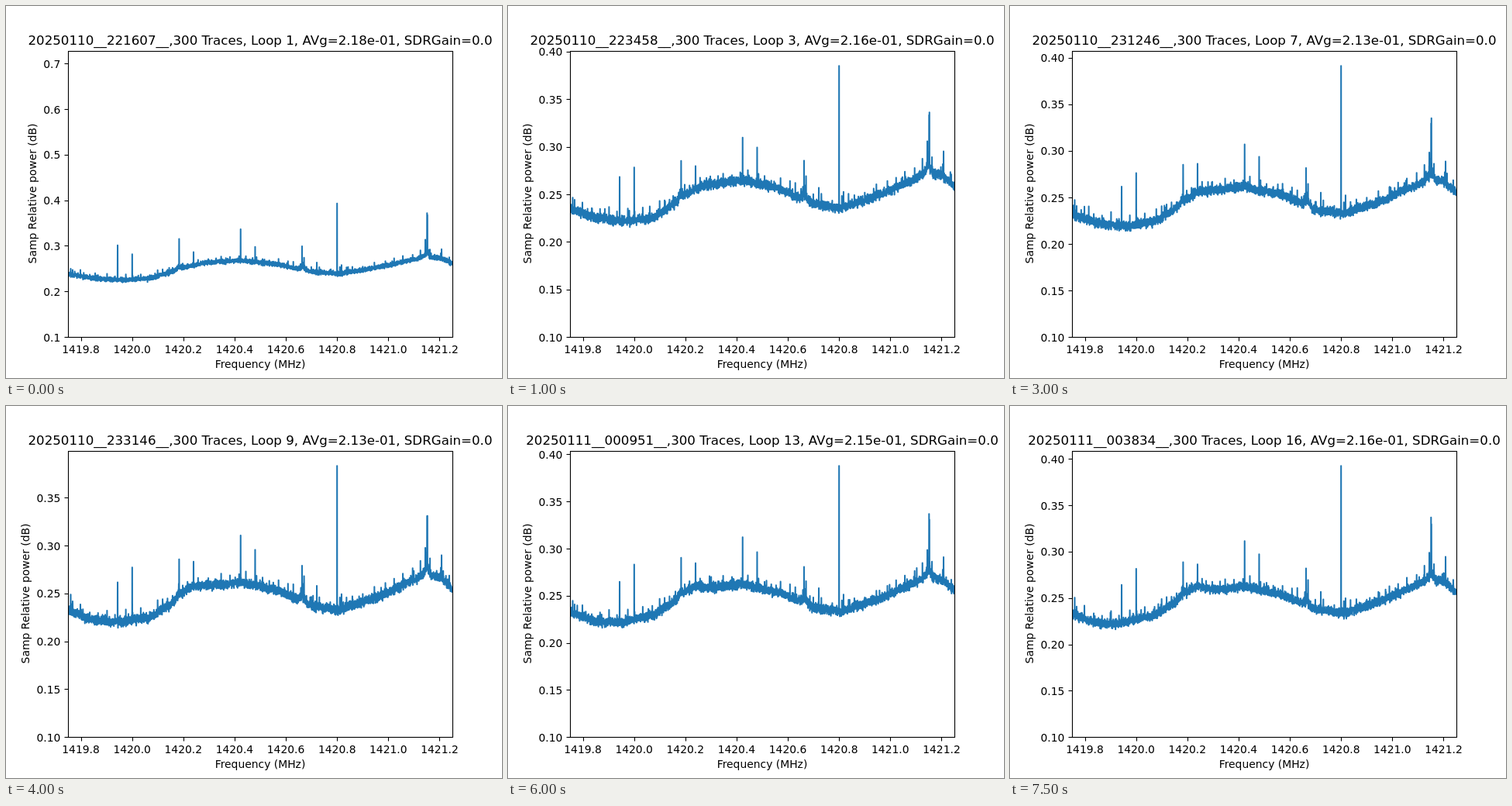
An HTML page that plays this animation: 640x480 px, repeating every 8000 ms.

```html
<!DOCTYPE html>
<html lang="en">
<head>
<meta charset="utf-8">
<title>Spectrum loops</title>
<style>
  html, body { margin: 0; width: 100%; height: 100%; overflow: hidden; background: #fff; }
  svg { display: block; width: 640px; height: 480px; }
  text { font: 13.889px "DejaVu Sans", sans-serif; fill: #000; text-anchor: middle; }
  #title { font-size: 16.667px; }
  #yTicks text { text-anchor: end; }
  .axis { fill: none; stroke: #000; stroke-width: 1.11; }
  #trace { fill: none; stroke: #1f77b4; stroke-width: 2.083; stroke-linejoin: round; }
</style>
</head>
<body>
<svg viewBox="0 0 640 480">
  <clipPath id="plot"><rect x="80" y="57.6" width="496" height="369.6"/></clipPath>
  <g clip-path="url(#plot)"><path id="trace"/></g>
  <g id="xTicks"></g>
  <g id="yTicks"></g>
  <rect class="axis" x="80.5" y="58.5" width="496" height="369"/>
  <text id="title" x="328" y="50"></text>
  <text x="328" y="467">Frequency (MHz)</text>
  <text id="yLabel">Samp Relative power (dB)</text>
</svg>
<script>
const LEFT = 80, RIGHT = 576, BOTTOM = 427.2, HEIGHT = 369.6, FLOOR = 0.1;
const LOOPS = 16, HOLD = 500, SAMPLES = 4400, STEP = (RIGHT - LEFT) / SAMPLES;
const PEAK_X = 427.2, PEAK_Y = 77.3;
const $ = id => document.getElementById(id);

// Key loops: clock in seconds of the first day, mean level, pixels per unit
const keyLoops = [1, 3, 5, 7, 9, 13, 16];
const clock = [80167, 81298, 82431, 83566, 84706, 86991, 88714];
const average = [2.18, 2.16, 2.13, 2.13, 2.13, 2.15, 2.16];
const scale = [588.6, 1228, 1212, 1202, 1236, 1216, 1197];

// Levels and heights are in 1e-4 of the axis unit
const bandX = [80, 110, 150, 185, 215, 240, 302, 350, 392, 430, 480, 538, 560, 576];
const band = [2320, 2226, 2182, 2215, 2365, 2545, 2615, 2528, 2371, 2322, 2462, 2680, 2668, 2550];

// Strong spikes: x, height above the band, growth in the first loop
const spikes = [
  [83.5, 150, 1], [144, 445, 1.75], [162.8, 570, 1], [223.4, 400, 1.6], [242, 270, 1],
  [302.7, 480, 1.4], [321.5, 350, 1], [382, 380, 1.3], [384.6, 260, 1], [401, 190, 1],
  [433, 170, 1], [541, 320, 1.2], [543.3, 650, 1.5], [543.8, 640, 1.5], [562, 265, 0.8]
];
// Ragged skirts around the widest signals: x, height
const skirts = [[223, 100], [383, 150], [543, 220]];

const bell = (x, mid, width, power = 2) => Math.exp(-((Math.abs(x - mid) / width) ** power));

function lerpAt(xs, ys, x) {
  let i = 1;
  while (i < xs.length - 1 && x > xs[i]) i++;
  return ys[i - 1] + (ys[i] - ys[i - 1]) * (x - xs[i - 1]) / (xs[i] - xs[i - 1]);
}

function seeded(seed) {
  return () => {
    seed = (seed + 0x6D2B79F5) | 0;
    let t = Math.imul(seed ^ seed >>> 15, 1 | seed);
    t ^= t + Math.imul(t ^ t >>> 7, 61 | t);
    return ((t ^ t >>> 14) >>> 0) / 4294967296;
  };
}

// The band starts high, settles by loop 5, then swells around x = 200
function bandLevel(x, loop) {
  const early = Math.max(0, (5 - loop) / 4), late = Math.max(0, (loop - 5) / 11);
  return lerpAt(bandX, band, x) +
    early * (67 - 50 * bell(x, 240, 10)) +
    late * (10 + 85 * bell(x, 200, 55, 4));
}

function tracePath(loop, unit) {
  const random = seeded(loop * 977), comb = seeded(42);
  const levels = Array.from({ length: SAMPLES + 1 }, (_, i) => {
    const x = LEFT + i * STEP;
    const noise = random() + random() + random() + random() - 2;
    let level = bandLevel(x, loop) + noise * 40;
    if (random() < 0.015) level += random() * 90;
    for (const [mid, height] of skirts)
      level += height * bell(x, mid, 2.5, 1) * (0.3 + 0.8 * random());
    return level;
  });
  const raise = (x, level) => {
    const i = Math.round((x - LEFT) / STEP);
    levels[i] = Math.max(levels[i], level);
  };
  for (const [x, height, growth] of spikes)
    raise(x, bandLevel(x, loop) + height * (loop === 1 ? growth : 1) + (random() - 0.5) * 70);
  // Weak interference at fixed places, stronger towards the right
  for (let x = 86; x < RIGHT - 1; x += 6 + comb() * 9)
    raise(x, bandLevel(x, loop) + (50 + 70 * comb()) * (1 + 0.5 * bell(x, 525, 35)) + random() * 30);
  // From the third loop on, the tallest spike sets the axis range
  raise(PEAK_X, loop < 3 ? 3930 : (FLOOR + (BOTTOM - PEAK_Y) / unit) * 1e4);
  return "M" + levels.map((v, i) =>
    (LEFT + i * STEP).toFixed(2) + " " + (BOTTOM - (v / 1e4 - FLOOR) * unit).toFixed(2)).join("L");
}

function yTicks(unit) {
  const top = FLOOR + HEIGHT / unit, wide = top > 0.6;
  const step = wide ? 0.1 : 0.05;
  let out = "";
  for (let n = 0; FLOOR + n * step <= top; n++) {
    const y = BOTTOM - n * step * unit;
    out += `<path class="axis" d="M75.5 ${Math.round(y) + 0.5}H80.5"/>` +
      `<text x="70.3" y="${Math.ceil(y + 5.2)}">${(FLOOR + n * step).toFixed(wide ? 1 : 2)}</text>`;
  }
  $("yTicks").innerHTML = out;
  $("yLabel").setAttribute("transform", `translate(${wide ? 39 : 30} 242) rotate(-90)`);
}

function xTicks() {
  let out = "";
  for (let n = 0; n < 8; n++) {
    const x = LEFT + (0.05 + n * 0.2) * (RIGHT - LEFT) / 1.5;
    out += `<path class="axis" d="M${Math.round(x) + 0.5} 427.5V432.5"/>` +
      `<text x="${x.toFixed(2)}" y="448">${(1419.8 + n * 0.2).toFixed(1)}</text>`;
  }
  $("xTicks").innerHTML = out;
}

function stamp(loop) {
  const s = Math.round(lerpAt(keyLoops, clock, loop));
  const two = n => String(Math.floor(n)).padStart(2, "0");
  const day = 20250110 + Math.floor(s / 86400);
  return `${day}__${two(s / 3600 % 24)}${two(s / 60 % 60)}${two(s % 60)}__`;
}

let shown = 0;
function draw(now) {
  const loop = Math.floor(now / HOLD) % LOOPS + 1;
  if (loop === shown) return;
  shown = loop;
  const unit = loop < 3 ? scale[0] : lerpAt(keyLoops, scale, loop);
  const mean = lerpAt(keyLoops, average, loop).toFixed(2);
  $("trace").setAttribute("d", tracePath(loop, unit));
  $("title").textContent = `${stamp(loop)},300 Traces, Loop ${loop}, AVg=${mean}e-01, SDRGain=0.0`;
  yTicks(unit);
}

function tick(now) {
  draw(now);
  requestAnimationFrame(tick);
}

xTicks();
draw(0);
requestAnimationFrame(tick);
</script>
</body>
</html>
```
